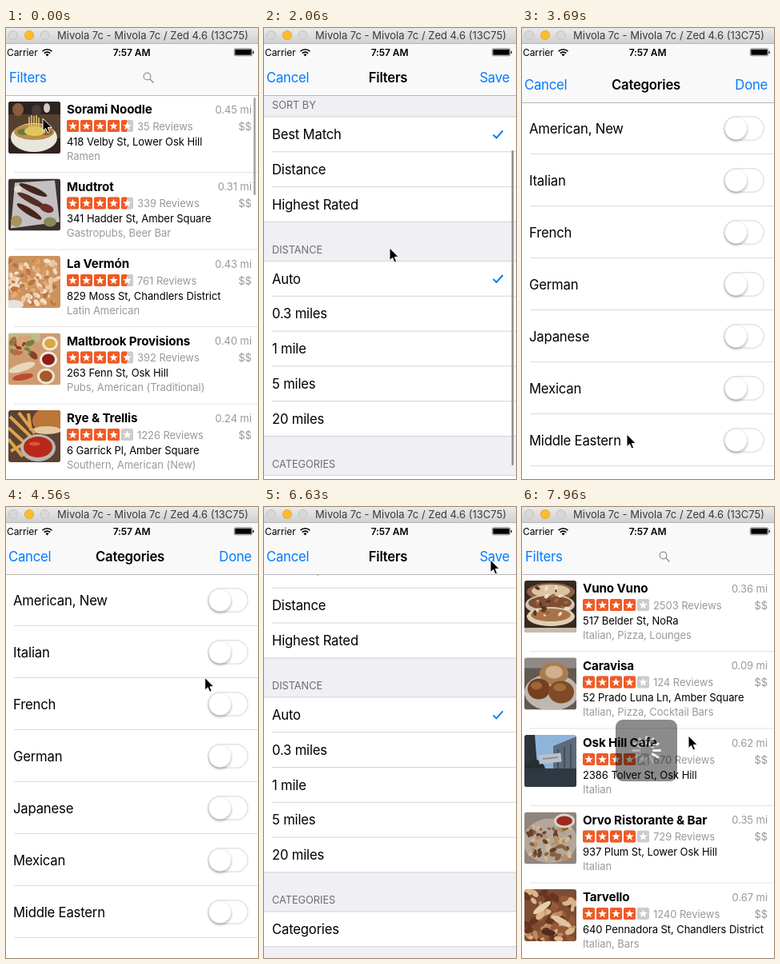
Recreate the animation shown at these times as an HTML page. Size 315 by 564 pixels, loop 8 s.

```html
<!DOCTYPE html>
<html lang="en">
<head>
<meta charset="utf-8">
<title>Restaurant filters</title>
<style>
html, body { margin: 0; width: 100%; height: 100%; overflow: hidden; background: #fff; }
svg { display: block; }
text { font-family: Inter, Roboto, "Liberation Sans", sans-serif; fill: #000; white-space: pre; }
.row { font-size: 16.7px; letter-spacing: -.2px; }
.bold { font-size: 16.7px; letter-spacing: -.22px; font-weight: 600; }
.link { font-size: 16.7px; letter-spacing: -.25px; fill: #007aff; }
.name { font-size: 15.2px; letter-spacing: -.15px; font-weight: 700; }
.addr { font-size: 13px; letter-spacing: -.06px; }
.note { font-size: 13px; letter-spacing: -.07px; fill: #999; }
.head { font-size: 12.8px; letter-spacing: -.05px; fill: #6d6d72; }
.bar { font-size: 12px; letter-spacing: -.1px; }
.clock { font-size: 12px; letter-spacing: -.1px; font-weight: 600; }
.title { font-size: 13px; fill: #3a3a3a; }
.knob { filter: drop-shadow(0 2px 1.5px rgba(0,0,0,.28)); }
</style>
</head>
<body>
<svg id="stage" width="315" height="564" viewBox="0 0 315 564"></svg>
<script>
const SIZES = { row: 16.7, bold: 16.7, link: 16.7, name: 15.2, addr: 13, note: 13, head: 12.8, bar: 12, clock: 12, title: 13 };

// Shape helpers; text is placed by the middle of its capitals.
const rect = (x, y, w, h, fill, more = '') => `<rect x="${x}" y="${y}" width="${w}" height="${h}" fill="${fill}" ${more}/>`;
const oval = (x, y, rx, ry, fill, turn = 0) =>
  `<ellipse cx="${x}" cy="${y}" rx="${rx}" ry="${ry}" fill="${fill}" transform="rotate(${turn} ${x} ${y})"/>`;
const path = (d, stroke, w, more = '') => `<path d="${d}" fill="none" stroke="${stroke}" stroke-width="${w}" ${more}/>`;
const text = (x, y, s, cls, anchor = 'start', more = '') =>
  `<text x="${x}" y="${y + SIZES[cls] * .364}" class="${cls}" text-anchor="${anchor}" ${more}>${s.replace('&', '&amp;')}</text>`;
const group = (x, y, body, more = '') => `<g transform="translate(${x} ${y})" ${more}>${body}</g>`;

function seeded(seed) {
  return () => (seed = (seed * 16807) % 2147483647) / 2147483647;
}

function blobs(n, seed, colors, x, y, w, h, size) {
  const rnd = seeded(seed);
  let out = '';
  for (let i = 0; i < n; i++) {
    const r = size * (.6 + rnd() * .7);
    out += oval((x + rnd() * w).toFixed(1), (y + rnd() * h).toFixed(1), r.toFixed(1), (r * .6).toFixed(1),
      colors[i % colors.length], Math.round(rnd() * 180));
  }
  return out;
}

// Simple food pictures, 65 x 65.
const PICS = {
  noodles: rect(0, 0, 65, 65, '#57402f') + rect(0, 0, 65, 16, '#2b2422') + oval(48, 8, 4, 6, '#d8cdbf') +
    oval(12, 10, 7, 8, '#8a5c3c') + oval(35, 11, 6, 7, '#4a3a36') + rect(0, 46, 65, 19, '#30231c') +
    oval(32, 45, 29, 18, '#e9e6de') + oval(32, 38, 25, 10, '#b98f47') + oval(19, 38, 8, 4, '#6c7a3b') +
    oval(46, 38, 9, 4, '#8d6038') + oval(33, 37, 13, 6, '#e2c65c') +
    path('M26 19V38M29 17V38M32 18V38M35 17V38M38 20V38', '#dfc566', 1.6),
  sausages: rect(0, 0, 65, 65, '#3a322f') + `<path d="M8 5L58 2L64 54L3 62Z" fill="#c4bfc2"/>` +
    oval(31, 14, 19, 4, '#43261d', 24) + oval(29, 27, 20, 4, '#52301f', 28) + oval(26, 41, 18, 4, '#452419', 32) +
    oval(48, 37, 9, 5, '#6b3027', 20) + oval(10, 53, 7, 7, '#a8935a') + oval(52, 54, 8, 6, '#878a56') + oval(12, 13, 5, 4, '#e4dccf'),
  shrimp: rect(0, 0, 65, 65, '#cb935f') +
    blobs(110, 71, ['#edc8a2', '#d9985f', '#f3dfc6', '#bd7543', '#e2ab78'], 2, 4, 61, 56, 4) + oval(7, 61, 12, 6, '#e9e2da'),
  board: rect(0, 0, 65, 65, '#cf9b70') + rect(0, 0, 40, 11, '#c3b88e') +
    blobs(16, 19, ['#8c3f2a', '#b86a45', '#6d8442', '#d9a274'], 4, 6, 30, 22, 5) + oval(52, 13, 10, 9, '#f0e9dc') + oval(52, 13, 7, 6, '#d9a93f') +
    oval(50, 33, 11, 10, '#f0e9dc') + oval(50, 33, 8, 7, '#8f1f17') + oval(47, 54, 11, 10, '#eee4d2') + oval(47, 54, 8, 7, '#a8572a') +
    oval(17, 43, 17, 5, '#ead7ba', -18) + oval(18, 55, 13, 4, '#bc4a35', -10),
  fries: rect(0, 0, 65, 65, '#5e4231') + oval(50, 13, 20, 16, '#bb7638') + oval(48, 25, 18, 5, '#e2c9a2') +
    path('M2 8L30 35M0 22L26 46M13 3L33 29M0 36L18 58M25 4L28 25M3 51L27 38', '#dba44c', 4) +
    oval(37, 47, 22, 17, '#b9b5b1') + oval(37, 46, 18, 13, '#b9271a') + oval(33, 42, 7, 2.5, '#d8553c'),
  pizza: rect(0, 0, 65, 65, '#382920') + oval(33, 14, 30, 11, '#8a6243') + oval(33, 13, 24, 8, '#dcc4a0') +
    oval(32, 30, 31, 13, '#cfc2ae') + oval(32, 28, 27, 9, '#7d4f33') + oval(33, 45, 30, 12, '#dfcfb4') + oval(33, 43, 25, 8, '#a87447') +
    rect(0, 59, 65, 6, '#c8bcae') + blobs(26, 33, ['#ecdcc0', '#5f3523', '#9c6844'], 10, 8, 45, 38, 3),
  croquettes: rect(0, 0, 65, 65, '#63594f') + rect(0, 0, 65, 13, '#8f8a85') + oval(34, 43, 34, 23, '#bdb8b1') +
    oval(37, 20, 18, 14, '#a87c50') + oval(37, 18, 11, 8, '#cfb08a') + oval(18, 39, 14, 13, '#754020') +
    oval(46, 43, 16, 14, '#804a26') + oval(15, 35, 7, 5, '#9c6637') + oval(44, 37, 8, 5, '#a26c3a'),
  street: rect(0, 0, 65, 65, '#8fb4da') + `<path d="M65 2L36 14V65H65Z" fill="#5d6a79"/>` +
    path('M42 18V60M50 15V60M58 12V60', '#444f5c', 2) + `<path d="M0 0H13L18 65H0Z" fill="#2a343a"/>` +
    oval(13, 48, 14, 17, '#232d33') + rect(18, 24, 28, 11, '#b9c2cc', 'transform="rotate(-6 32 29)"') +
    path('M23 30L42 28', '#8a929b', 2) + rect(0, 42, 65, 23, '#2e3840'),
  calamari: rect(0, 0, 65, 65, '#8f857d') + oval(32, 36, 34, 28, '#b3a79b') +
    blobs(60, 57, ['#8a6040', '#b98f63', '#644229', '#d3b993'], 4, 18, 54, 40, 4) +
    oval(50, 11, 13, 9, '#dcd4cc') + oval(50, 11, 10, 6, '#9c2a21'),
  pasta: rect(0, 0, 65, 65, '#7d4d33') + blobs(60, 91, ['#bd8a5c', '#68341f', '#d9b588', '#965a38'], 2, 2, 61, 61, 6) +
    oval(22, 23, 13, 4, '#e5ceae', -35) + oval(46, 40, 14, 4, '#e0c5a0', 28) + oval(30, 54, 9, 4, '#55291b', 10)
};

// picture, name, stars, reviews, address, kinds, distance
const BEFORE = [
  ['noodles', 'Sorami Noodle', 4.5, 35, '418 Velby St, Lower Osk Hill', 'Ramen', '0.45'],
  ['sausages', 'Mudtrot', 4.5, 339, '341 Hadder St, Amber Square', 'Gastropubs, Beer Bar', '0.31'],
  ['shrimp', 'La Vermón', 4.5, 761, '829 Moss St, Chandlers District', 'Latin American', '0.43'],
  ['board', 'Maltbrook Provisions', 4.5, 392, '263 Fenn St, Osk Hill', 'Pubs, American (Traditional)', '0.40'],
  ['fries', 'Rye & Trellis', 4, 1226, '6 Garrick Pl, Amber Square', 'Southern, American (New)', '0.24']
];
const AFTER = [
  ['pizza', 'Vuno Vuno', 4, 2503, '517 Belder St, NoRa', 'Italian, Pizza, Lounges', '0.36'],
  ['croquettes', 'Caravisa', 4, 124, '52 Prado Luna Ln, Amber Square', 'Italian, Pizza, Cocktail Bars', '0.09'],
  ['street', 'Osk Hill Cafe', 4, 870, '2386 Tolver St, Osk Hill', 'Italian', '0.62'],
  ['calamari', 'Orvo Ristorante & Bar', 4, 729, '937 Plum St, Lower Osk Hill', 'Italian', '0.35'],
  ['pasta', 'Tarvello', 4, 1240, '640 Pennadora St, Chandlers District', 'Italian, Bars', '0.67']
];

const STAR = Array.from({ length: 10 }, (_, i) => {
  const a = i * Math.PI / 5, r = i % 2 ? 2.3 : 5.6;
  return (7.5 + r * Math.sin(a)).toFixed(2) + ',' + (7.8 - r * Math.cos(a)).toFixed(2);
}).join(' ');

function stars(score) {
  let out = '';
  for (let i = 0; i < 5; i++) {
    const part = Math.max(0, Math.min(1, score - i));
    out += group(76 + i * 17, 23, rect(0, 0, 15, 15, '#ccc', 'rx="2"') +
      (part ? rect(0, 0, 15 * part, 15, '#f15a24', 'rx="2"') : '') + `<polygon points="${STAR}" fill="#fff"/>`);
  }
  return out;
}

const place = ([pic, name, score, count, addr, kinds, far], i) => group(0, 92 + 96.5 * i,
  group(3, 0, PICS[pic], 'clip-path="url(#round)"') + text(76, 9.5, name, 'name') + stars(score) +
  text(164, 31, count + ' Reviews', 'note') + text(76, 50, addr, 'addr') + text(76, 68, kinds, 'note') +
  text(307, 10, far + ' mi', 'note', 'end') + text(307, 31, '$$', 'note', 'end') + rect(10, 88, 305, 1, '#e4e4e6'));

const navBar = body => rect(0, 20, 315, 64, '#f9f9f9') + rect(0, 84, 315, 1, '#b6b6b8') + body;
const modalNav = (title, action, id) => navBar(text(3, 62, 'Cancel', 'link') +
  text(155, 62, title, 'bold', 'middle') + text(307, 62, action, 'link', 'end', `id="${id}"`));

const toggle = (x, y, id = '') => group(x, y,
  rect(.75, .75, 49.5, 29.5, '#fff', 'rx="14.75" stroke="#e3e3e5" stroke-width="1.5"') +
  (id && rect(0, 0, 51, 31, '#44db5e', `rx="15.5" id="${id}Fill"`)) +
  `<g ${id && `id="${id}Knob"`}><circle class="knob" cx="15.5" cy="15.5" r="14" fill="#fff" stroke="#dedee0" stroke-width=".5"/></g>`);

const ROW = 43.8, LINE = '#d3d3d7';

function section(top, items, checked) {
  const h = items.length * ROW;
  return rect(0, top, 315, h, '#fff') + rect(0, top - .5, 315, 1, LINE) + rect(0, top + h - .5, 315, 1, LINE) +
    items.map((s, i) => text(10, top + ROW * i + 22, s, 'row') +
      (i ? rect(10, top + ROW * i - .5, 305, 1, LINE) : '')).join('') +
    (checked ? path(`M286.5 ${top + 22.5}l4 4l8-9`, '#0f7bf5', 2) : '');
}

const filterRows = rect(0, 114, 315, 44, '#fff') + rect(0, 113.5, 315, 1, LINE) + rect(0, 157.5, 315, 1, LINE) +
  text(4, 136, 'Offering a Deal', 'row') + toggle(258.5, 120.5) +
  text(10, 191.5, 'SORT BY', 'head') + section(206, ['Best Match', 'Distance', 'Highest Rated'], true) +
  text(10, 372, 'DISTANCE', 'head') + section(386.5, ['Auto', '0.3 miles', '1 mile', '5 miles', '20 miles'], true) +
  text(10, 640, 'CATEGORIES', 'head') + section(654.5, ['Categories'], false);

const CUISINES = ['American, New', 'Italian', 'French', 'German', 'Japanese', 'Mexican', 'Middle Eastern'];
const cuisineRows = CUISINES.map((s, i) => text(9, 116.5 + 65 * i, s, 'row') +
  toggle(252, 101 + 65 * i, i === 1 ? 'italian' : '') + rect(10, 148 + 65 * i, 305, 1, '#dcdcdf')).join('');

const modal = (id, body) => `<svg id="${id}" x="0" y="20" width="315" height="544" viewBox="0 20 315 544">${body}</svg>`;

const spokes = Array.from({ length: 12 }, (_, i) =>
  path('M0-9V-17', '#fff', 3, `stroke-linecap="round" opacity="${(.2 + .8 * (i / 11) ** 1.6).toFixed(2)}" transform="rotate(${30 * i})"`)).join('');

const statusBar = text(1, 30.5, 'Carrier', 'bar') + text(157, 30.5, '7:57 AM', 'clock', 'middle') +
  path('M45.5 29.3a8.5 8.5 0 0 1 12 0M47.8 31.6a5.3 5.3 0 0 1 7.4 0', '#000', 1.6) +
  '<path d="M51.5 35.4l-2-2.1a2.9 2.9 0 0 1 4 0Z"/>' +
  rect(285.3, 25.8, 22.4, 9, '#fff', 'rx="1.8" stroke="#333" stroke-width=".6"') +
  rect(286.3, 26.8, 20.4, 7, '#000', 'rx=".8"') + rect(308.5, 28.7, 1.4, 3.4, '#222', 'rx=".7"');

const light = (x, fill, edge) => `<circle cx="${x}" cy="9" r="5.6" fill="${fill}" stroke="${edge}" stroke-width=".8"/>`;
const titleBar = rect(0, 0, 315, 20, 'url(#metal)') + rect(0, 19, 315, 1, '#b9b9b9') + light(9, '#d8d8d8', '#bdbdbd') +
  light(29, '#fdbc2e', '#e0a32a') + light(48.5, '#d8d8d8', '#bdbdbd') +
  text(64, 9.5, 'Mivola 7c - Mivola 7c / Zed 4.6 (13C75)', 'title');

document.getElementById('stage').innerHTML =
  `<defs><clipPath id="round"><rect width="65" height="65" rx="3"/></clipPath>
   <linearGradient id="metal" x2="0" y2="1"><stop stop-color="#eaeaea"/><stop offset="1" stop-color="#cfcfcf"/></linearGradient></defs>` +
  rect(0, 0, 315, 564, '#fff') +
  `<g id="before">${BEFORE.map(place).join('')}</g><g id="after">${AFTER.map(place).join('')}</g>` +
  navBar(text(4, 62, 'Filters', 'link') + '<circle cx="176.5" cy="60.5" r="4.4" fill="none" stroke="#8e8e93" stroke-width="1.2"/>' +
    path('M179.8 63.8L184.5 68.5', '#8e8e93', 1.4)) +
  rect(309.5, 87, 2.5, 122, '#a3a3a3', 'rx="1.2" id="listThumb"') +
  group(155.5, 304.5, rect(-38.5, -38.5, 77, 77, '#000', 'rx="9" opacity=".8"') + `<g id="spin">${spokes}</g>`, 'id="hud"') +
  modal('filters', rect(0, 20, 315, 544, '#efeff4') + `<g id="table">${filterRows}</g>` +
    rect(309.5, 87, 2.5, 394, '#8f8f92', 'rx="1.2" id="thumb"') + modalNav('Filters', 'Save', 'save')) +
  modal('cuisines', rect(0, 20, 315, 544, '#fff') + cuisineRows + modalNav('Categories', 'Done', 'done')) +
  statusBar + titleBar +
  '<path id="cursor" d="M0 0V15.6L3.6 12.4L6 18L8.6 16.9L6.3 11.4H11.2Z" fill="#000" stroke="#fff" stroke-width="1"/>';

const TICK = 147.4, LOOP = 8000;
const TRACKS = {
  cursor: [[0, 46, 113], [1, 38, 94], [2, 27, 68], [3, 23, 57], [8, 23, 57], [9, 40, 95], [10, 95, 215], [11, 148, 345],
    [12, 157, 372], [14, 157, 275], [15, 157, 232], [16, 156, 222], [17, 150, 300], [18, 138, 430], [19, 132, 500],
    [20, 131, 508], [25, 131, 508], [26, 136, 490], [30, 239, 227], [33, 268, 186], [36, 270, 184], [38, 256, 191],
    [39, 276, 118], [40, 283, 66], [50, 283, 66], [51, 277, 92], [53, 222, 262], [54, 208, 286]],
  filters: [[3, 544], [4, 320], [5, 80], [6, 19], [7, 4], [8, 0], [49, 0], [50, 331], [51, 494], [52, 532], [53, 544]],
  scroll: [[12, 0], [14, 95], [15, 135], [16, 155], [17, 160], [18, 154], [19, 150], [20, 148.6]],
  thumb: [[11, 0], [12, 1], [18, 1], [20, 0]],
  listThumb: [[0, 1], [3, 0]],
  cuisines: [[22, 544], [23, 200], [24, 42], [25, 9], [26, 2], [27, 0], [42, 0], [43, 440], [44, 520], [45, 544]],
  italian: [[33, 0], [34, .35], [35, .9], [36, 1]],
  hud: [[49, 0], [50, .36], [51, 1], [53, 1], [54, .57]]
};

function at(name, k) {
  const keys = TRACKS[name], n = keys.findIndex(key => key[0] > k);
  if (n === 0) return keys[0].slice(1);
  if (n < 0) return keys[keys.length - 1].slice(1);
  const a = keys[n - 1], b = keys[n], p = (k - a[0]) / (b[0] - a[0]);
  return a.slice(1).map((v, i) => v + (b[i + 1] - v) * p);
}

const el = {};
document.querySelectorAll('#stage [id]').forEach(e => el[e.id] = e);
const set = (id, attr, value) => el[id].setAttribute(attr, value);

function draw(ms) {
  const k = Math.floor((ms % LOOP + 12) / TICK);
  const one = name => at(name, k)[0];
  const scroll = one('scroll'), on = one('italian'), top = 87 + 66 * scroll / 95;
  set('cursor', 'transform', `translate(${at('cursor', k).join(' ')})`);
  set('filters', 'y', 20 + one('filters'));
  set('cuisines', 'y', 20 + one('cuisines'));
  set('table', 'transform', `translate(0 ${-scroll})`);
  set('thumb', 'y', top);
  set('thumb', 'height', Math.min(394, 561 - top));
  for (const id of ['thumb', 'listThumb', 'hud']) set(id, 'opacity', one(id));
  set('italianFill', 'opacity', on);
  set('italianKnob', 'transform', `translate(${20 * on} 0)`);
  set('done', 'opacity', k >= 43 ? .5 : 1);
  set('save', 'opacity', k >= 49 ? .5 : 1);
  set('spin', 'transform', `rotate(${30 * Math.floor(k * 1.77) - 180})`);
  set('before', 'visibility', k < 54 ? 'visible' : 'hidden');
  set('after', 'visibility', k < 54 ? 'hidden' : 'visible');
}

const start = performance.now();
function loop() {
  draw(performance.now() - start);
  requestAnimationFrame(loop);
}
draw(0);
loop();
</script>
</body>
</html>
```
